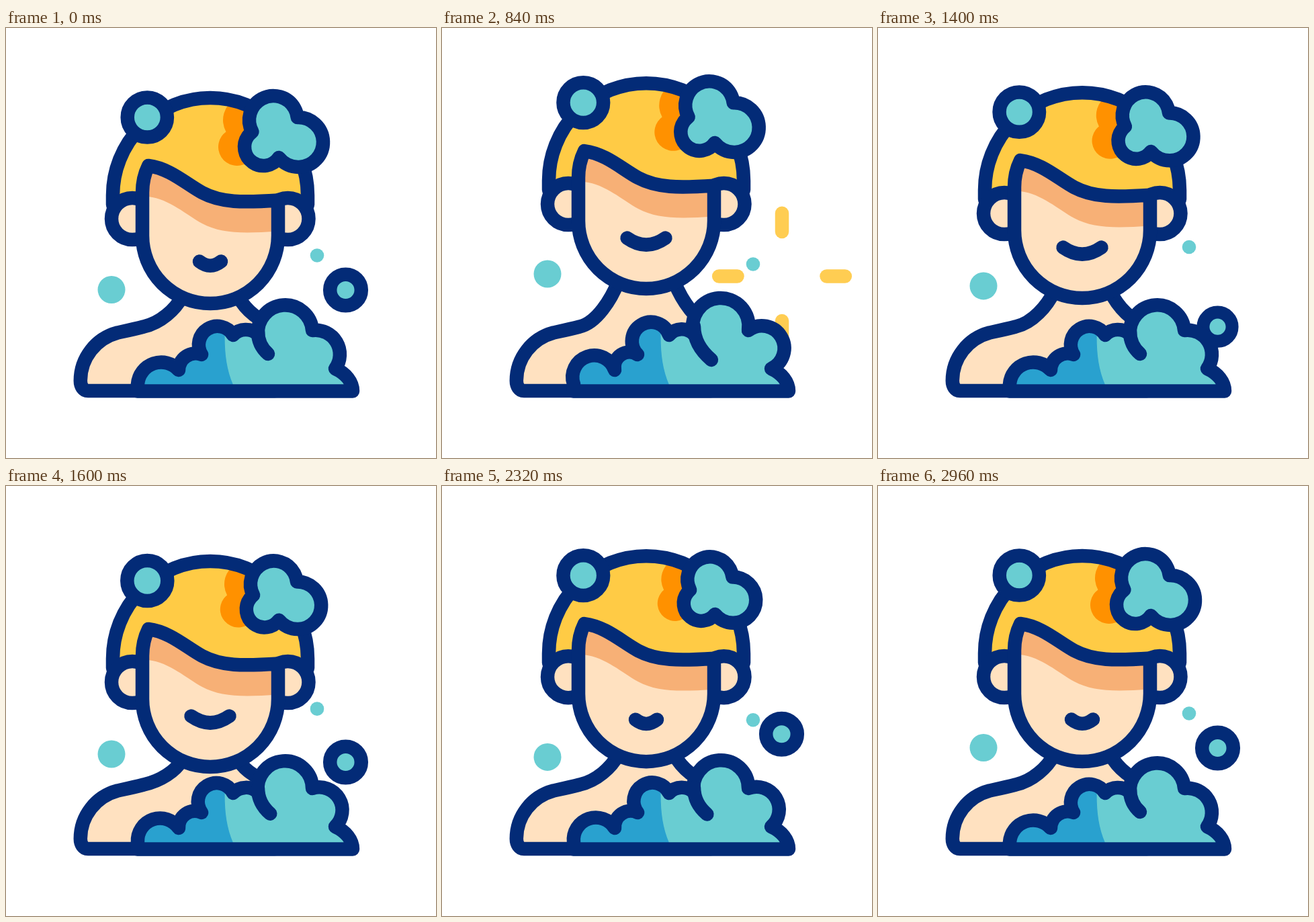
An HTML page with a canvas for the animation above (3000 ms loop, 640 by 640 pixels).

```html
<!DOCTYPE html>
<html lang="en">
<head>
<meta charset="utf-8">
<title>Shower</title>
<style>
html, body { margin: 0; width: 100%; height: 100%; overflow: hidden; background: #fff; }
canvas { display: block; width: 640px; height: 640px; }
</style>
</head>
<body>
<canvas id="stage" width="640" height="640"></canvas>
<script>
const ctx = document.getElementById('stage').getContext('2d');
const LOOP = 3000, STEP = 40, TAU = Math.PI * 2;
const INK = '#032b77', TEAL = '#69cdd2', BLUE = '#29a1cf', SKIN = '#ffe1c0',
  SHADE = '#f7b076', HAIR = '#ffcb45', ORANGE = '#ff9100', SPARK = '#ffcd52';

const mix = (a, b, k) => a + (b - a) * k;

// Eased 0 to 1 between two times
function ease(t, from, to) {
  const u = Math.min(1, Math.max(0, (t - from) / (to - from)));
  return u * u * (3 - 2 * u);
}

// Smooth rise to 1 and back to 0 around a time
function swell(t, peak, half) {
  const u = Math.min(1, Math.abs(t - peak) / half);
  return (1 + Math.cos(Math.PI * u)) / 2;
}

function paint(path, fill, stroke) {
  if (fill) {
    ctx.fillStyle = fill;
    ctx.fill(path);
  }
  if (stroke) {
    ctx.strokeStyle = stroke;
    ctx.stroke(path);
  }
}

const shape = (d, fill, stroke) => paint(new Path2D(d), fill, stroke);

function disc(x, y, r, fill, stroke) {
  const path = new Path2D();
  path.arc(x, y, r, 0, TAU);
  paint(path, fill, stroke);
}

// Outline of overlapping circles listed clockwise as [x, y, r]
function cluster(circles) {
  const path = new Path2D(), n = circles.length;
  const meet = ([x, y, r], [x2, y2, r2]) => {
    const d = Math.hypot(x2 - x, y2 - y);
    return [Math.atan2(y2 - y, x2 - x), Math.acos((d * d + r * r - r2 * r2) / (2 * d * r))];
  };
  circles.forEach((c, i) => {
    const [from, a] = meet(c, circles[(i + n - 1) % n]);
    const [to, b] = meet(c, circles[(i + 1) % n]);
    path.arc(...c, from + a, to - b);
  });
  path.closePath();
  return path;
}

function drawSparks(t) {
  const tip = mix(32, 101, ease(t, 600, 900));
  const tail = mix(32, 101, ease(t, 640, 1040));
  if (tip - tail < .5) return;
  for (let i = 0; i < 4; i++) {
    const dx = Math.round(Math.cos(i * TAU / 4)), dy = Math.round(Math.sin(i * TAU / 4));
    const at = r => `${506 + dx * r} ${369.5 + dy * r}`;
    shape(`M${at(tail)}L${at(tip)}`, null, SPARK);
  }
}

function drawRing(t) {
  const size = 1 - ease(t, 560, 680) + ease(t, 1200, 1440);
  if (size < .01) return;
  const y = t < 1000
    ? 390 - 20.5 * ease(t, 0, 560)
    : 460 - 98 * ease(t, 1200, 2000) + 28 * ease(t, 2000, 2960);
  ctx.save();
  ctx.translate(505.5, y);
  ctx.scale(size, size);
  disc(0, 0, 23.3, TEAL, INK);
  ctx.restore();
}

function drawBubbles(t) {
  disc(157, 389.5 - 25 * swell(t, 1000, 1000) + 23.5 * swell(t, 1900, 950), 20.5, TEAL);
  drawSparks(t);
  drawRing(t);
  const rise = 13 * swell(t, 850, 800) - 16 * swell(t, 1340, 500) + 10.5 * swell(t, 2200, 700);
  disc(463, 338.5 + rise, 10.3, TEAL);
}

function drawBody(dy) {
  const top = 400 + dy, bend = 419 + dy * .7;
  const left = `M262 ${top}C252 ${bend} 230 439 205 444.5C192 448 180 450.5 166 453.5` +
    'C134 462 110.8 491 110.8 525C110.8 533 115 540 122 540H400';
  const right = `405 444.5C378 439 356 ${bend} 346 ${top}`;
  shape(`${left}L${right}Z`, SKIN);
  shape(left, null, INK);
  shape(`M${right}`, null, INK);
}

function drawHead(t, dy) {
  const q = 1 - swell(t, 420, 400) - swell(t, 1160, 360) - swell(t, 2000, 620);
  const cloud = [
    [mix(400, 398, q), mix(141, 137, q), mix(31, 36, q)],
    [mix(431, 435, q), mix(169, 170, q), mix(31, 37, q)],
    [mix(389, 383, q), mix(172, 177, q), mix(24, 28, q)]
  ];
  const hair = new Path2D('M159 263V249A145 145 0 0 1 449 249V263');
  const fringe = 'M212 205C244 209 268 232 292 245C320 260 352 260 405 256.5';
  const face = `${fringe}V309A101 101 0 0 1 203 309V245Q203 223 212 205Z`;

  ctx.save();
  ctx.translate(0, dy);

  paint(hair, HAIR);
  ctx.save();
  ctx.clip(hair);
  ctx.translate(-39, 0);
  paint(cluster(cloud), ORANGE);
  ctx.restore();
  paint(hair, null, INK);

  disc(188, 284, 31, SKIN, INK);
  disc(419.5, 284, 31, SKIN, INK);

  // The fringe casts its own outline lower down as a shadow
  const brow = new Path2D(face);
  paint(brow, SHADE);
  ctx.save();
  ctx.clip(brow);
  ctx.translate(0, 46);
  shape(`${fringe}V400H190V203Z`, SKIN);
  ctx.restore();
  paint(brow, null, INK);

  const m = ease(t, 480, 800) - ease(t, 1640, 2080);
  const w = mix(16, 28.5, m), y = mix(347.5, 334.5, m);
  shape(`M${304 - w} ${y}Q304 ${mix(360, 354.5, m)} ${304 + w} ${y}`, null, INK);

  const pulse = Math.abs(Math.sin(Math.PI * t / 740)) ** 3;
  disc(210.3, 133, 29.6 + 3.5 * pulse, TEAL, INK);
  paint(cluster(cloud), TEAL, INK);
  ctx.restore();
}

function drawFoam(p) {
  let x = 196, y = 530;
  let d = `M195.5 540.5L${x} ${y}`;
  // Arc to a fixed notch; bulge is its height as a share of the chord
  const bump = (ex, ey, low, high) => {
    const bulge = mix(low, high, p);
    const r = Math.hypot(ex - x, ey - y) * (bulge / 2 + 1 / (8 * bulge));
    d += `A${r} ${r} 0 ${bulge > .5 ? 1 : 0} 1 ${ex} ${ey}`;
    x = ex;
    y = ey;
  };
  bump(257, 509, .33, .5);
  bump(291, 486, .26, .33);
  bump(338, 457, .5, .63);
  bump(375, 456, .2, .22);
  bump(456, 450, .5, .63);
  bump(490, 507, .33, .56);
  d += 'C506 514 516 527 516 540.5Z';

  const foam = new Path2D(d);
  paint(foam, TEAL);
  ctx.save();
  ctx.clip(foam);
  shape('M327 420C324 470 325 500 338 531V545H180V420Z', BLUE);
  ctx.restore();
  paint(foam, null, INK);
  shape(`M${mix(390, 401, p)} ${mix(485, 494, p)}Q375 472 375 ${mix(452, 444, p)}`, null, INK);
}

function draw(t) {
  const dy = 12.5 * (ease(t, 0, 400) - ease(t, 1740, 2360))
    - 39 * (ease(t, 400, 960) - ease(t, 1080, 1740));
  ctx.fillStyle = '#fff';
  ctx.fillRect(0, 0, 640, 640);
  ctx.lineWidth = 20.5;
  ctx.lineCap = ctx.lineJoin = 'round';
  drawBubbles(t);
  drawBody(dy);
  drawHead(t, dy);
  drawFoam(swell(t, 805, 560) + swell(t, 1980, 600));
}

const start = performance.now();
function tick() {
  const t = (performance.now() - start) % LOOP;
  draw(Math.floor(t / STEP) * STEP);
  requestAnimationFrame(tick);
}
tick();
</script>
</body>
</html>
```
